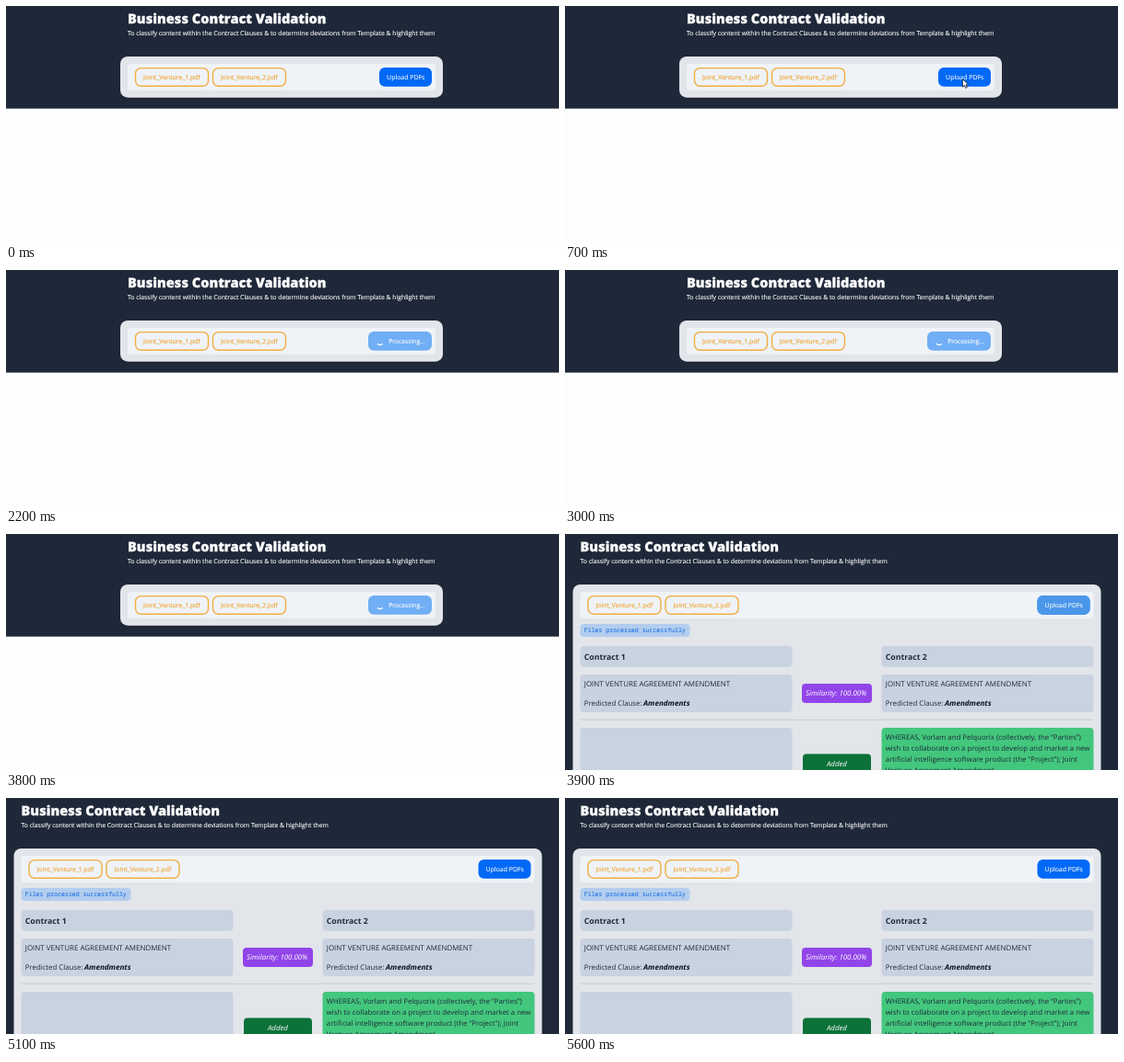
These frames come from a looping animation (600x257 px, 7000 ms). An HTML page:

```html
<!DOCTYPE html>
<html lang="en">
<head>
<meta charset="utf-8">
<title>Business Contract Validation</title>
<style>
  html, body { margin: 0; width: 100%; height: 100%; overflow: hidden; background: #1e2838; }
  svg { display: block; width: 100%; height: 100%; }
  text {
    font-family: "Open Sans", "Noto Sans", sans-serif;
    text-rendering: geometricPrecision;
    white-space: pre;
  }
  .title { font-size: 14.5px; font-weight: 800; fill: #fff; stroke: #fff; stroke-width: .3; }
  .small { font-size: 6.82px; fill: #fff; stroke: #fff; stroke-width: .12; }
  .button { font-size: 6.95px; fill: #fff; stroke: #fff; stroke-width: .1; }
  .file { font-size: 6.82px; fill: #f0a02c; stroke: #f0a02c; stroke-width: .12; }
  .status { font: 6.55px "Noto Sans Mono", "DejaVu Sans Mono", monospace; fill: #1f72e6; stroke: #1f72e6; stroke-width: .1; }
  .head { font-size: 8.7px; font-weight: 700; fill: #1f2a3a; }
  .body { font-size: 7.8px; fill: #1f2a3a; }
  .caps { font-size: 7.95px; fill: #1f2a3a; }
  .clause { font-size: 8.1px; font-weight: 700; font-style: italic; fill: #0c1420; }
  .badge { font-size: 7.85px; font-weight: 500; font-style: italic; fill: #fff; }
</style>
</head>
<body>
<svg id="stage" viewBox="0 0 600 257"></svg>
<script>
const LOOP = 7000, CLICK = 1600, DONE = 3900, SPIN = 800;
const NAVY = '#1e2838', CARD = '#e2e5ea', PANEL = '#eff3f8';
const SLATE = '#c9d2e0', BLUE = '#0169f6';

const rect = (x, y, w, h, r, fill, extra = '') =>
  `<rect x="${x}" y="${y}" width="${w}" height="${h}" rx="${r}" fill="${fill}" ${extra}/>`;
const text = (x, y, cls, str) => `<text x="${x}" y="${y}" class="${cls}">${str}</text>`;

const pill = (x, name) =>
  rect(x, 67.6, 79, 19.6, 6, PANEL, 'stroke="#f1ad42" stroke-width="1.4"') +
  text(x + 8.5, 80, 'file', name);

// Heading, card, toolbar panel and file pills, shared by both views
const shell = (left, width, height) =>
  text(left, 19, 'title', 'Business Contract Validation') +
  text(left, 32, 'small', 'To classify content within the Contract Clauses &amp; to determine deviations from Template &amp; highlight them') +
  rect(left - 8, 55, width + 16, height, 8, CARD) +
  rect(left, 63, width, 29, 4, PANEL) +
  pill(left + 8.5, 'Joint_Venture_1.pdf') +
  pill(left + 92.5, 'Joint_Venture_2.pdf');

const upload = (x, overlay = '') =>
  rect(x, 67, 57, 20.7, 6, BLUE) + overlay +
  text(x + 8.1, 80, 'button', 'Upload PDFs');

const busy =
  '<g id="busy">' + rect(393, 67, 69, 20.7, 6, '#70aef5') +
  rect(397, 67, 39, 20.7, 0, '#8dbdf6', 'id="flash"') +
  '<path id="spinner" d="M403 80.3A4.2 4.2 0 0 1 403 74.3" fill="none" stroke="#fff" stroke-width="1.2"/>' +
  text(415.2, 80, 'small', 'Processing...') + '</g>';

const column = (x, n) =>
  rect(x, 122, 230, 22.7, 4, SLATE) +
  text(x + 4.3, 136.8, 'head', 'Contract ' + n) +
  rect(x, 153, 230, 41, 4, SLATE) +
  text(x + 4.3, 166, 'caps', 'JOINT VENTURE AGREEMENT AMENDMENT') +
  text(x + 4.3, 187, 'body', 'Predicted Clause:') +
  text(x + 68.5, 187, 'clause', 'Amendments');

const clause = [
  'WHEREAS, Vorlam and Pelquorix (collectively, the “Parties”)',
  'wish to collaborate on a project to develop and market a new',
  'artificial intelligence software product (the “Project”); Joint',
  'Venture Agreement Amendment'
].map((line, i) => text(347.8, 224 + i * 12, 'body', line)).join('');

const form = '<g id="form">' +
  rect(0, 0, 600, 257, 0, '#fefdfe') + rect(0, 0, 600, 111.7, 0, NAVY) +
  shell(132, 334, 44.7) + '<g id="send">' + upload(405) + '</g>' + busy + '</g>';

const report = '<g id="report">' +
  rect(0, 0, 600, 257, 0, NAVY) +
  shell(16.5, 557, 230) +
  upload(512.5, rect(512.5, 67, 57, 20.7, 6, '#4b98ea', 'id="fade"')) +
  rect(16.5, 98, 119, 14, 4, '#b3cdee') +
  text(20.8, 107, 'status', 'Files processed successfully') +
  column(16.5, 1) + column(343.5, 2) +
  rect(257, 163, 76, 21, 4, '#9145e9') +
  text(261, 176.4, 'badge', 'Similarity: 100.00%') +
  rect(16.5, 201.8, 557, 1, 0, '#c9ccd2') +
  rect(16.5, 211, 230, 70, 4, SLATE) +
  rect(343.5, 211, 230, 70, 4, '#43c77d') + clause +
  rect(258, 239.5, 74, 21, 4, '#0c7239') +
  text(284, 252.6, 'badge', 'Added') + '</g>';

const cursor = '<path id="cursor" d="M0 0V8.6L2 6.8L3.4 9.9L4.9 9.2L3.5 6.2H6.2Z" ' +
  'fill="#fff" stroke="#1b1f2a" stroke-width=".8" stroke-linejoin="round"/>';

const stage = document.getElementById('stage');
stage.innerHTML = form + report + cursor;
const el = {};
stage.querySelectorAll('[id]').forEach(node => el[node.id] = node);

const clamp = v => Math.min(1, Math.max(0, v));
const mix = (a, b, k) => a + (b - a) * k;
const show = (node, on) => node.setAttribute('display', on ? 'inline' : 'none');

function pointer(t) {
  if (t < CLICK) {
    const k = 1 - (1 - clamp((t - 100) / 700)) ** 2;
    return [mix(502, 430, k), mix(107, 79, k)];
  }
  const k = clamp((t - CLICK) / 400) ** 2;
  return [mix(430, 690, k), mix(79, 100, k)];
}

function draw(t) {
  const working = t >= CLICK && t < DONE;
  show(el.form, t < DONE);
  show(el.report, t >= DONE);
  show(el.send, !working);
  show(el.busy, working);
  show(el.flash, t < CLICK + 100);
  show(el.cursor, t >= 100 && t < 2000);

  el.cursor.setAttribute('transform', `translate(${pointer(t)})`);
  el.spinner.setAttribute('transform', `rotate(${(t - CLICK) / SPIN * 360} 406 77.3)`);
  el.fade.setAttribute('opacity', 1 - clamp((t - DONE) / 200));
}

function tick() {
  draw(performance.now() % LOOP);
  requestAnimationFrame(tick);
}
tick();
</script>
</body>
</html>
```
